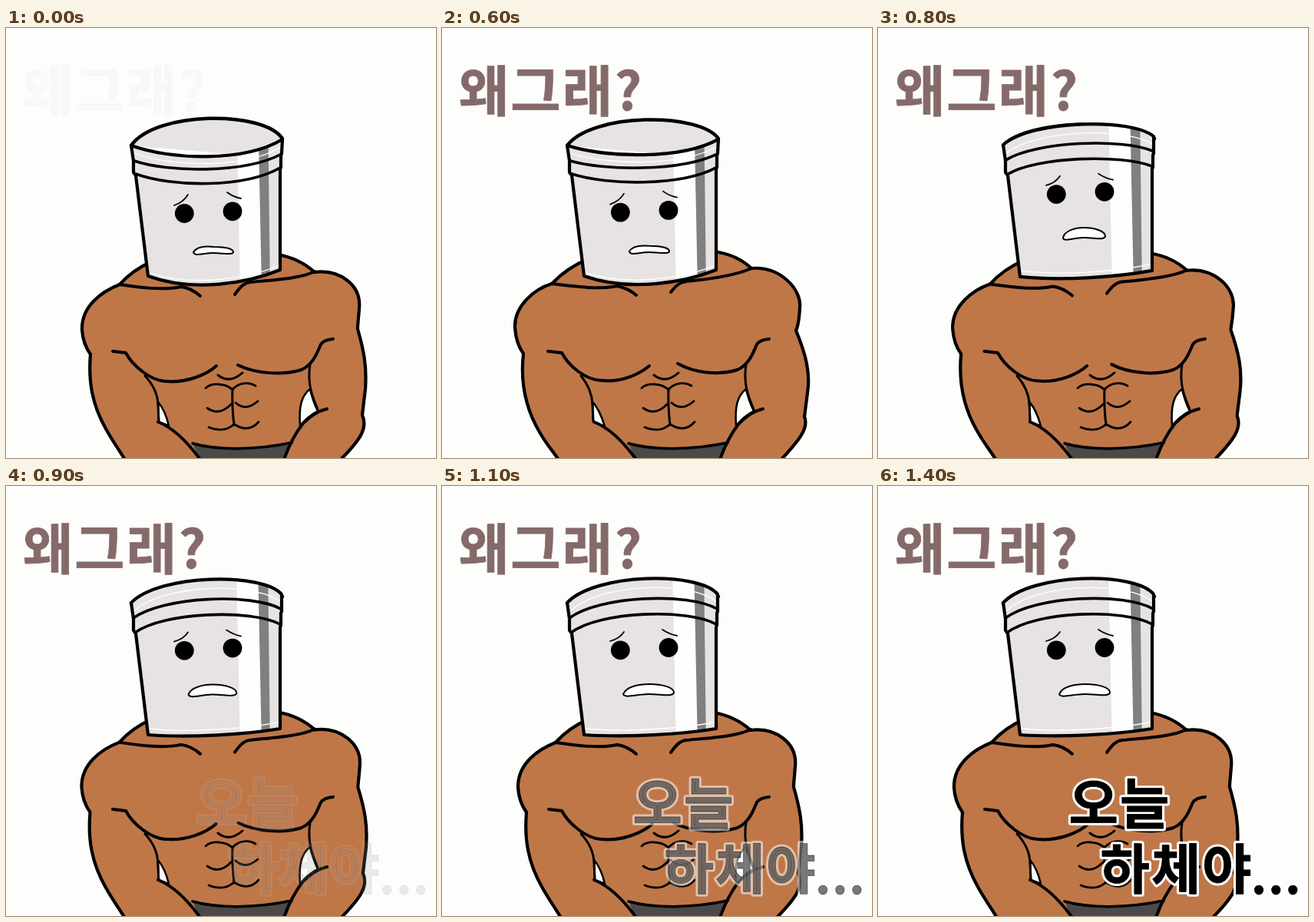
An HTML page with a canvas for the animation above (2400 ms loop, 560 px wide and 560 px high).

```html
<!DOCTYPE html>
<html lang="ko">
<head>
<meta charset="utf-8">
<style>
  html, body { margin: 0; width: 100%; height: 100%; overflow: hidden; background: #fdfdfb; }
  canvas { display: block; width: 100vw; height: 100vh; }
</style>
</head>
<body>
<canvas id="stage" width="560" height="560"></canvas>
<script>
const ctx = document.getElementById('stage').getContext('2d');
const LOOP = 2400, STEP = 100;
const INK = '#000', PAPER = '#fdfdfb', SKIN = '#bf7748', TIN = '#e7e3e3';

// One value per 100 ms step; the last value holds.
const tracks = {
  shrug: [0, .5, 1, 1, 1, 1, 1, .88, .45, .12, 0],
  lift:  [0, 0, 0, 0, 0, 0, .05, .5, .9, .98, 1],
  mouth: [0, 0, 0, 0, 0, 0, .05, .5, 1, 1.7, 2],
  ask:   [.03, .5, 1],
  reply: [0, 0, 0, 0, 0, 0, 0, 0, 0, .08, .3, .53, .77, .93, 1]
};
const at = (track, i) => track[Math.min(i, track.length - 1)];
const lerp = (a, b, k) => a + (b - a) * k;

// Blends two path strings of the same structure.
function mix(a, b, k) {
  const to = b.match(/-?[\d.]+/g);
  let i = 0;
  return a.replace(/-?[\d.]+/g, n => lerp(+n, +to[i++], k).toFixed(2));
}

function fill(d, color) {
  ctx.fillStyle = color;
  ctx.fill(new Path2D(d));
}

function line(d, width = 4, color = INK) {
  ctx.strokeStyle = color;
  ctx.lineWidth = width;
  ctx.stroke(new Path2D(d));
}

function dot(x, y, r) {
  ctx.fillStyle = INK;
  ctx.beginPath();
  ctx.arc(x, y, r, 0, Math.PI * 2);
  ctx.fill();
}

function drawBody(k) {
  const leftArm = mix(
    '148 334C125 343 98 362 99 393C100 408 105 418 110 425C107 460 112 490 130 522C140 540 149 552 156 564',
    '143 333C120 340 94 362 95 390C96 405 100 416 106 424C102 460 108 495 128 528C138 545 146 553 153 564', k);
  const rightArm = mix(
    '402 318C435 314 463 335 460 365C459 380 458 385 458 392C466 420 470 440 468 470L464 504C471 520 464 534 434 564',
    '403 313C440 310 469 340 466 365C465 380 463 390 461 394C474 425 480 450 476 475L472 506C478 521 466 536 440 564', k);
  const leftTrap = mix('148 334Q165 315 190 304', '143 333Q163 312 190 301', k);
  const rightTrap = mix('354 295Q382 300 402 318', '354 291Q384 295 403 313', k);

  fill(`M${leftTrap}L${rightTrap}L${rightArm}L156 564L${leftArm.split('C')[0]}Z`, SKIN);
  fill(`M${leftArm}L300 564L300 334Z`, SKIN);
  fill(`M${rightArm}L300 564L300 318Z`, SKIN);

  // gaps between arms and waist
  const leftGap = mix('M198 487C204 494 209 505 212 518L199 513Z',
                      'M196 487C203 494 208 506 212 519L197 513Z', k);
  const rightGap = 'M396 470C385 479 381 492 383 518Q394 505 406 499Q399 484 396 470Z';
  [leftGap, rightGap].forEach(d => { fill(d, PAPER); line(d, 2.6); });

  const shorts = 'M243 541C275 550 325 550 372 540L362 564L253 564Z';
  fill(shorts, '#4a4a4a');
  line('M243 541C275 550 325 550 372 540', 3.5);

  [leftTrap, rightTrap, leftArm, rightArm].forEach(d => line('M' + d, 4.2));

  // collarbones
  line(mix('M148 334C175 338 205 342 228 337C238 338 246 343 253 349',
           'M143 333C175 337 205 341 228 336C238 338 246 342 253 348', k));
  line(mix('M298 347C305 337 310 332 318 331C350 328 385 326 402 317',
           'M298 344C305 335 310 331 318 330C350 327 385 321 403 313', k));

  // chest
  line(mix('M139 421L156 423C165 440 188 459 207 460C235 463 262 451 274 440',
           'M138 421L156 423C165 440 186 458 207 459C235 462 258 450 270 440', k));
  line(mix('M302 439C325 450 360 453 385 445C399 439 405 424 410 412Q414 406 426 405',
           'M307 437C328 449 360 453 385 445C399 439 405 424 410 412Q414 406 426 405', k));
  line('M276 452Q291 464 308 449', 3);

  // abs
  line('M295 470Q294 492 297 517', 3);
  ['M260 469C267 462 285 462 295 471C303 461 317 461 325 466',
   'M262 495Q278 506 293 490', 'M299 488Q312 500 328 486',
   'M264 520Q284 528 297 516Q316 528 329 513'].forEach(d => line(d, 2.8));

  // inner arms
  line(mix('M181 453Q197 470 198 490L199 513', 'M181 453Q195 470 196 490L197 512', k), 3);
  line('M396 438C392 464 399 480 406 497', 3);
  line('M198 513C216 520 234 536 253 562');
  line('M418 496Q401 500 386 516Q372 534 362 562');
}

function drawTin(k) {
  const back = 118 + 11 * Math.sqrt(k);
  const lid = `M163 153C195 ${back - 10} 335 ${back - 11} 360 144`;
  const front = mix('163 153C215 172 310 175 360 145', '163 152C200 113 335 111 359 141', k);
  const base = mix('357 315C315 332 245 345 185 323', '357 316C315 323 240 328 185 324', k);
  const shell = `M${front}L359 163L358 166L358 181L357 184L${base}L169 192L166 188L166 173Z`;

  fill(`${lid}L360 170L163 153Z`, TIN);
  line(lid, 4.5);

  fill(shell, TIN);
  ctx.save();
  ctx.clip(new Path2D(shell));
  fill('M300 100L332 100L335 340L305 340Z', '#fefefe');
  fill('M328 100L341 100L344 340L333 340Z', '#808080');
  line(mix('M167 163C215 181 310 184 358 155', 'M167 163C205 126 325 123 358 151', k), 1.3, '#fff');
  line(mix('M187 319C245 338 315 326 357 309', 'M187 316C240 321 315 316 357 307', k), 1.3, '#fff');
  ctx.restore();

  line(mix('M167 173C210 188 310 190 359 164', 'M166 172C205 143 320 138 358 160', k), 3.6);
  line(mix('M169 190C215 207 310 209 357 182', 'M168 191C205 163 320 159 357 180', k), 3.6);
  line(shell, 4.2);
}

const mouths = [
  'M244 292C248 285 260 284 270 285C284 285 296 287 296 292C295 296 283 293 270 293C256 293 246 298 244 292Z',
  'M241 273C243 264 257 260 268 260C283 260 296 265 296 271C295 277 282 273 268 273C254 273 241 279 241 273Z',
  'M236 271C240 261 257 258 270 258C286 258 302 262 302 269C301 275 285 271 269 271C254 271 238 277 236 271Z'
];

function drawFace(k, m) {
  dot(232.3, lerp(241.5, 213.8, k), 12.4);
  dot(295, lerp(238.8, 210.5, k), 12.4);
  line(mix('M219 231Q231 227 237 217', 'M219 202Q231 199 237 190', k), 1.8);
  line(mix('M288 214Q296 220 306 222', 'M287 187Q296 193 306 195', k), 1.8);
  const i = Math.min(Math.floor(m), 1);
  const lips = mix(mouths[i], mouths[i + 1], m - i);
  fill(lips, '#fff');
  line(lips, 2);
}

function letter([text, x, y, size], color, edge) {
  ctx.font = `700 ${size}px "Noto Sans CJK KR", "Noto Sans CJK", "Noto Sans CJK JP", sans-serif`;
  ctx.fillStyle = ctx.strokeStyle = color;
  ctx.lineWidth = edge;
  ctx.strokeText(text, x, y);
  ctx.fillText(text, x, y);
}

function drawText(parts, color, alpha, halo) {
  ctx.globalAlpha = alpha;
  ctx.letterSpacing = '2px';
  if (halo) parts.forEach(p => letter(p, '#fff', 7));
  // a hairline edge gives the heavier weight once fully opaque
  parts.forEach(p => letter(p, color, .8));
  ctx.globalAlpha = 1;
}

function draw(time) {
  const i = Math.floor(time % LOOP / STEP);
  const lift = at(tracks.lift, i);
  ctx.fillStyle = PAPER;
  ctx.fillRect(0, 0, 560, 560);
  ctx.lineCap = ctx.lineJoin = 'round';
  drawBody(at(tracks.shrug, i));
  drawTin(lift);
  drawFace(lift, at(tracks.mouth, i));
  drawText([['왜그래', 22, 108, 71], ['?', 225, 107, 68]], '#856a6a', at(tracks.ask, i));
  drawText([['오늘', 248.5, 440, 70], ['하체야', 289.5, 525, 70], ['...', 486, 531, 62]],
    INK, at(tracks.reply, i), true);
}

const start = performance.now();
(function tick() {
  draw(performance.now() - start);
  requestAnimationFrame(tick);
})();
</script>
</body>
</html>
```
